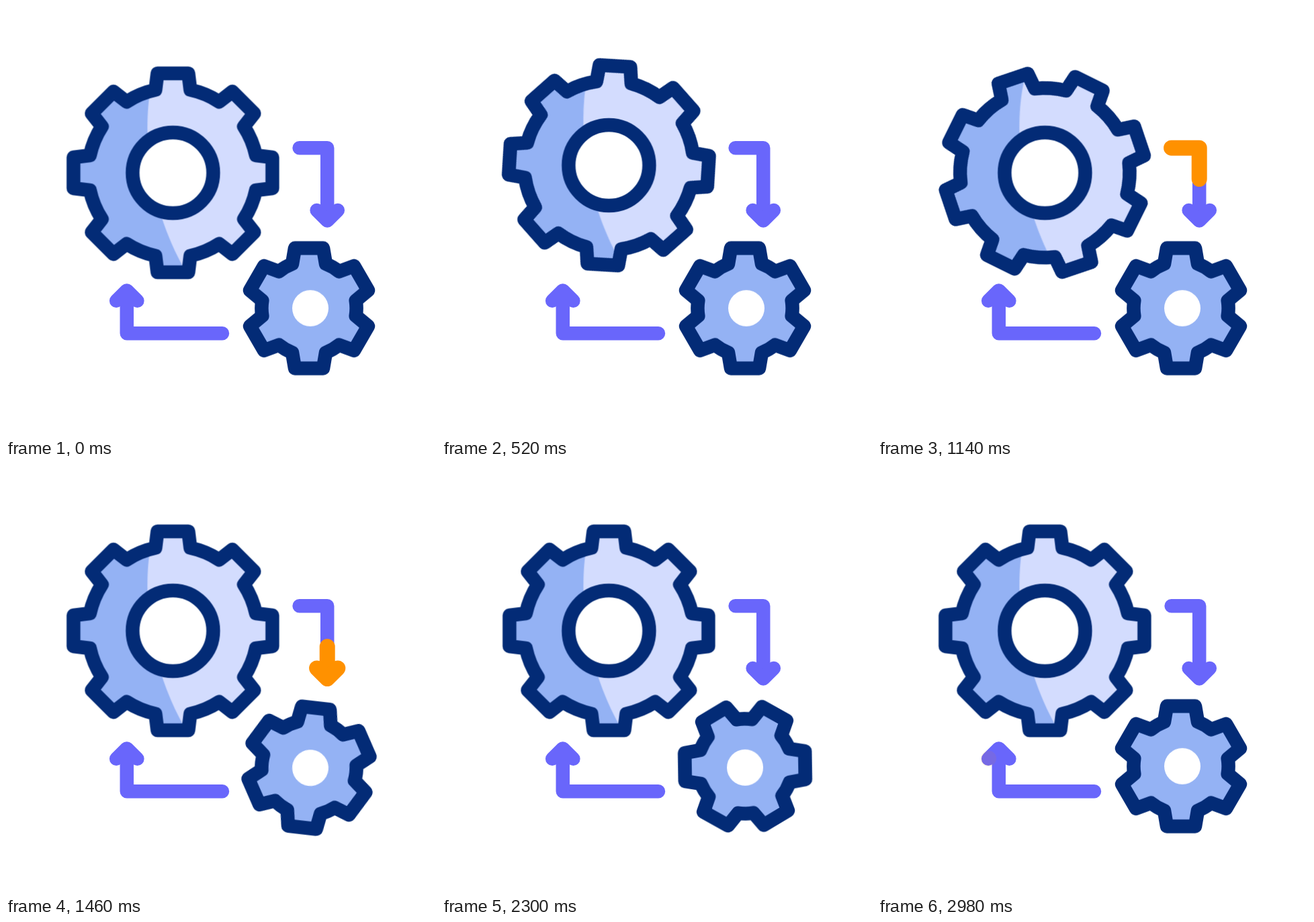
Write an HTML page that moves like this. It is 640 px wide and 640 px high and loops after 3000 ms.

```html
<!DOCTYPE html>
<html lang="en">
<head>
<meta charset="utf-8">
<title>Gears</title>
<style>
  html, body { margin: 0; width: 100%; height: 100%; overflow: hidden; background: #fff; }
  svg { display: block; width: 100vw; height: 100vh; }

  .dark { stroke: #032b76; stroke-width: 20.5; }
  .line { stroke: #6966fb; stroke-width: 20.5; }
  .lit { stroke: #ff9100; stroke-width: 23; }
  .dark, .line, .lit { fill: none; stroke-linecap: round; stroke-linejoin: round; }

  .lift, .drop, .spin, .unspin, .spin2, .stem, .head {
    animation: 3s cubic-bezier(.3333, 0, .6667, 1) infinite;
  }
  .lift { animation-name: lift; }
  .drop { animation-name: drop; }
  .spin { animation-name: spin; }
  .unspin { animation-name: unspin; }
  .spin2 { animation-name: spin2; }
  .stem { animation-name: stem, stem-on; animation-timing-function: cubic-bezier(.3333, 0, .6667, 1), step-end; }
  .head { animation-name: head, head-on; animation-timing-function: cubic-bezier(.3333, 0, .6667, 1), linear; }
  .late { animation-delay: -1610ms; }

  @keyframes lift { 0%, 20%, 100% { transform: translateY(0); } 10% { transform: translateY(-65.5px); } }
  @keyframes drop {
    0%, 46.67%, 66.67%, 100% { transform: translateY(0); }
    56.67% { transform: translateY(21px); }
  }
  @keyframes spin {
    0%, .1% { transform: rotate(0deg); }
    22% { transform: rotate(360deg); }
    43.9%, 100% { transform: rotate(720deg); }
  }
  @keyframes unspin {
    0%, .1% { transform: rotate(0deg); }
    22% { transform: rotate(-360deg); }
    43.9%, 100% { transform: rotate(-720deg); }
  }
  @keyframes spin2 {
    0%, 46.9% { transform: rotate(0deg); }
    69.4% { transform: rotate(360deg); }
    91.9%, 100% { transform: rotate(720deg); }
  }

  /* each highlight grows along its path, then its tail catches up */
  @keyframes stem {
    0%, 34% { stroke-dasharray: 0 300; stroke-dashoffset: 0; }
    40.67%, 42.33% { stroke-dasharray: 100 300; stroke-dashoffset: 0; }
    51.67%, 100% { stroke-dasharray: 100 300; stroke-dashoffset: -100; }
  }
  @keyframes stem-on { 0%, 51.67%, 100% { opacity: 0; } 34% { opacity: 1; } }
  @keyframes head {
    0%, 40.67% { stroke-dasharray: 0 300; stroke-dashoffset: 0; }
    43.67%, 51% { stroke-dasharray: 100 300; stroke-dashoffset: 0; }
    53.2%, 100% { stroke-dasharray: 100 300; stroke-dashoffset: -100; }
  }
  @keyframes head-on {
    0%, 40.66% { opacity: 0; }
    40.67%, 51.3% { opacity: 1; }
    53.2%, 100% { opacity: 0; }
  }
</style>
</head>
<body>
<svg viewBox="0 0 640 640">
  <defs>
    <path id="big"/>
    <path id="small"/>
    <clipPath id="body"><use href="#big"/></clipPath>
    <path id="stem1" pathLength="100" d="M436.6 211.2H478.2V304"/>
    <path id="head1" pathLength="100" d="M462.6 304L478.2 319.6L493.8 304"/>
    <path id="stem2" pathLength="100" d="M322 487.2H179.8V439"/>
    <path id="head2" pathLength="100" d="M195.4 438.8L179.8 423.4L164.2 438.8"/>
  </defs>

  <g class="line">
    <use href="#stem1"/><use href="#head1"/>
    <use href="#stem2"/><use href="#head2"/>
  </g>
  <g class="lit">
    <path class="stem" pathLength="100" d="M436.6 211.2H478.2V304"/>
    <path class="head" pathLength="100" d="M462.6 304L478.2 319.6L493.8 304"/>
    <path class="stem late" pathLength="100" d="M322 487.2H179.8V439"/>
    <path class="head late" pathLength="100" d="M195.4 438.8L179.8 423.4L164.2 438.8"/>
  </g>

  <g transform="translate(248.4 248.3)">
    <g class="lift">
      <g class="spin">
        <use href="#big" fill="#d3dcfe"/>
        <g clip-path="url(#body)">
          <g class="unspin">
            <path transform="translate(-248.4 -248.3)" fill="#94b2f4"
              d="M228 56L216 118C204 180 208 290 266 392L290 434H60V56Z"/>
          </g>
        </g>
        <use href="#big" class="dark"/>
      </g>
      <circle r="60" fill="#fff"/>
      <circle r="60" class="dark"/>
    </g>
  </g>

  <g transform="translate(451 449.8)">
    <g class="drop">
      <g class="spin2">
        <use href="#small" fill="#94b2f4"/>
        <use href="#small" class="dark"/>
        <circle cx="2" r="27" fill="#fff"/>
      </g>
    </g>
  </g>
</svg>
<script>
  // Outline of a gear: tooth tip at (±tipX, -tipY), tooth root at (±rootX, -rootY)
  function gear(teeth, tipX, tipY, rootX, rootY) {
    const radius = Math.hypot(rootX, rootY);
    const tooth = [[-rootX, -rootY], [-tipX, -tipY], [tipX, -tipY], [rootX, -rootY]];
    let d = '';
    for (let i = 0; i < teeth; i++) {
      const a = i * 2 * Math.PI / teeth, c = Math.cos(a), s = Math.sin(a);
      tooth.forEach(([x, y], k) => {
        const join = k ? 'L' : i ? `A${radius} ${radius} 0 0 1 ` : 'M';
        d += `${join}${(x * c - y * s).toFixed(2)} ${(x * s + y * c).toFixed(2)}`;
      });
    }
    return `${d}A${radius} ${radius} 0 0 1 ${-rootX} ${-rootY}Z`;
  }
  document.getElementById('big').setAttribute('d', gear(8, 23, 148, 26, 123.5));
  document.getElementById('small').setAttribute('d', gear(6, 21, 89.5, 25, 66));
</script>
</body>
</html>
```
